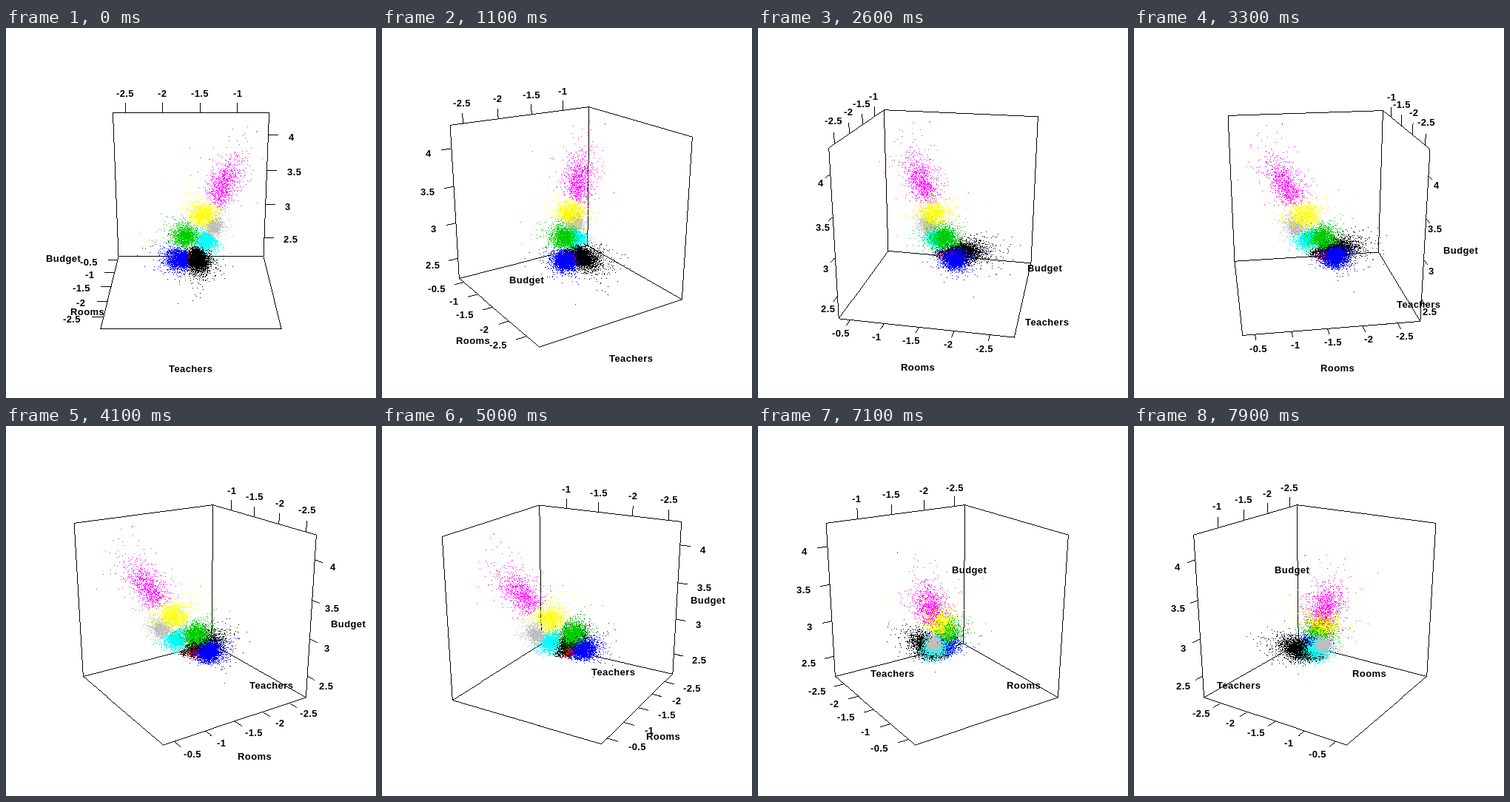
Animation, 500 px wide and 500 px high, one loop 8 s. Source, as an HTML page with a canvas:

```html
<!DOCTYPE html>
<html lang="en">
<head>
<meta charset="utf-8">
<title>Rotating scatter plot</title>
<style>
  html, body { margin: 0; width: 100%; height: 100%; overflow: hidden; background: #fff; }
  canvas { display: block; }
</style>
</head>
<body>
<canvas id="stage" width="500" height="500"></canvas>
<script>
const SIZE = 500, STEP = 100, LOOP = 8000;
const FOCAL = 933, DIST = 8.24;
const TILT = Math.PI / 9, TS = Math.sin(TILT), TC = Math.cos(TILT);

const ctx = document.getElementById('stage').getContext('2d');
const image = ctx.createImageData(SIZE, SIZE);
const pixels = new Uint32Array(image.data.buffer);
const depths = new Float32Array(SIZE * SIZE);
const rgb = (r, g, b) => (0xff000000 | b << 16 | g << 8 | r) >>> 0;
const BLACK = rgb(0, 0, 0), WHITE = rgb(255, 255, 255);

// Seeded random numbers
let seed = 20771;
function rand() {
  seed = (seed + 0x6d2b79f5) | 0;
  let t = Math.imul(seed ^ seed >>> 15, 1 | seed);
  t = (t + Math.imul(t ^ t >>> 7, 61 | t)) ^ t;
  return ((t ^ t >>> 14) >>> 0) / 4294967296;
}
const gauss = () => Math.sqrt(-2 * Math.log(1 - rand())) * Math.cos(2 * Math.PI * rand());

// Point groups: colour, count, centre, spread, stretch along one direction
const groups = [
  { color: BLACK, n: 3200, mid: [.07, -.52, .2], sd: [.075, .07, .12], along: [.02, .02, .08] },
  { color: rgb(255, 0, 0), n: 350, mid: [0, -.56, .08], sd: [.035, .03, .06], along: [0, 0, 0], free: true },
  { color: rgb(0, 205, 0), n: 1700, mid: [-.06, -.29, .03], sd: [.085, .08, .09], along: [-.02, .02, .02] },
  { color: rgb(0, 0, 255), n: 2600, mid: [-.13, -.53, .17], sd: [.075, .07, .08], along: [-.03, .02, .02] },
  { color: rgb(0, 255, 255), n: 1700, mid: [.18, -.4, -.1], sd: [.075, .07, .08], along: [.03, 0, 0] },
  { color: rgb(255, 0, 255), n: 900, mid: [.38, .2, -.33], sd: [.1, .1, .1], along: [.08, .16, -.08] },
  { color: rgb(255, 255, 0), n: 1200, mid: [.15, -.08, -.15], sd: [.1, .08, .1], along: [.02, .02, -.02] },
  { color: rgb(190, 190, 190), n: 1100, mid: [.28, -.28, -.25], sd: [.055, .05, .06], along: [.03, .04, -.02] }
];

function gap(p, g) {
  const [dx, dy, dz] = p.map((v, i) => v - g.mid[i]);
  return dx * dx + dy * dy + .3 * dz * dz;
}

function fits(p, g) {
  if (p.some(v => Math.abs(v) > 1) || p[1] < -.62 - .36 * p[2]) return false;
  const own = gap(p, g);
  return g.free || groups.every(o => o.free || o === g || gap(p, o) >= own);
}

const points = [];
for (const g of groups) {
  for (let left = g.n; left > 0;) {
    const tail = .6 - .42 * Math.log(1 - rand()), pull = gauss();
    const p = g.mid.map((m, i) => m + tail * (gauss() * g.sd[i] + pull * g.along[i]));
    if (!fits(p, g)) continue;
    points.push([...p, g.color]);
    left--;
  }
}
points.push([.79, .92, -.34, rgb(255, 0, 255)], [-.15, -1, .41, rgb(0, 0, 255)]);

// Axes: each lists the box edges it may sit on and the way its ticks point
const X_UP = [0, 1, 0], X_DOWN = [0, -1, 0], RIGHT = [1, 0, 0], LEFT = [-1, 0, 0];
const axes = [
  { slot: 0, title: 'Teachers', titleAt: [0, -1.3, 1.3], ticks: [-2.5, -2, -1.5, -1],
    place: v => .948 * v + 1.536,
    edges: [[[0, 1, -1], X_UP], [[0, 1, 1], X_UP], [[0, -1, -1], X_DOWN], [[0, -1, 1], X_DOWN]] },
  { slot: 1, title: 'Budget', titleAt: [-1.3, 0, 1.3], ticks: [2.5, 3, 3.5, 4],
    place: v => .956 * v - 3.109,
    edges: [[[1, 0, -1], RIGHT], [[1, 0, 1], RIGHT], [[-1, 0, -1], LEFT], [[-1, 0, 1], LEFT]] },
  { slot: 2, title: 'Rooms', titleAt: [-1.3, -1.3, 0], ticks: [-2.5, -2, -1.5, -1, -.5],
    place: v => -.8 * v - 1.264,
    edges: [[[-1, -1, 0], LEFT], [[1, -1, 0], RIGHT], [[-1, 1, 0], X_UP], [[1, 1, 0], X_UP]] }
];

let sin = 0, cos = 1;

// Depth toward the viewer after turning and tilting
const toward = ([x, y, z]) => y * TS + (z * cos - x * sin) * TC;

function project(p) {
  const [x, y, z] = p;
  const dist = DIST - toward(p), k = FOCAL / dist;
  return [250 + k * (x * cos + z * sin), 250 - k * (y * TC - (z * cos - x * sin) * TS), dist];
}

function faceNormal(slot, sign) {
  const n = [0, 0, 0];
  n[slot] = sign;
  return n;
}
const isBack = (slot, sign) => toward(faceNormal(slot, sign)) < 0;

function line(a, b) {
  const [x0, y0] = project(a), [x1, y1] = project(b);
  const n = Math.max(1, Math.ceil(Math.max(Math.abs(x1 - x0), Math.abs(y1 - y0))));
  for (let i = 0; i <= n; i++) {
    const x = Math.floor(x0 + (x1 - x0) * i / n), y = Math.floor(y0 + (y1 - y0) * i / n);
    pixels[y * SIZE + x] = BLACK;
  }
}

// Outline of every box face that looks away from the viewer
function drawBox() {
  for (let slot = 0; slot < 3; slot++) {
    for (const sign of [-1, 1]) {
      if (!isBack(slot, sign)) continue;
      const corners = [[-1, -1], [1, -1], [1, 1], [-1, 1]].map(([u, v]) => {
        const p = [sign, sign, sign];
        p[(slot + 1) % 3] = u;
        p[(slot + 2) % 3] = v;
        return p;
      });
      corners.forEach((p, i) => line(p, corners[(i + 1) % 4]));
    }
  }
}

function drawPoints() {
  depths.fill(1e9);
  for (const p of points) {
    const [x, y, d] = project(p);
    const i = Math.floor(y) * SIZE + Math.floor(x);
    if (d < depths[i]) {
      depths[i] = d;
      pixels[i] = p[3];
    }
  }
}

// The outline edge whose ticks point most toward the viewer
function pickEdge(axis) {
  let best = null;
  for (const edge of axis.edges) {
    const backs = edge[0].filter((s, i) => i !== axis.slot && isBack(i, s)).length;
    if (backs === 1 && (!best || toward(edge[1]) > toward(best[1]))) best = edge;
  }
  return best;
}

function drawTicks(axis, labels) {
  const [at, dir] = pickEdge(axis);
  for (const v of axis.ticks) {
    const base = at.slice();
    base[axis.slot] = axis.place(v);
    const out = k => base.map((c, i) => c + dir[i] * k);
    line(base, out(.125));
    const [x, y] = project(out(.25));
    labels.push({ text: String(v), x, y: y + (dir[1] > 0 ? 4.7 : 7.4), lean: dir[0] * cos });
  }
}

function draw(step) {
  const angle = step * 3 * Math.PI / 180;
  sin = Math.sin(angle);
  cos = Math.cos(angle);
  pixels.fill(WHITE);
  const labels = [];
  drawBox();
  for (const axis of axes) {
    drawTicks(axis, labels);
    const [x, y] = project(axis.titleAt);
    labels.push({ text: axis.title, x, y: y + 7, lean: 0 });
  }
  drawPoints();
  ctx.putImageData(image, 0, 0);

  ctx.font = 'bold 13px "Liberation Sans", Arial, sans-serif';
  ctx.letterSpacing = '0.4px';
  ctx.fillStyle = '#000';
  for (const { text, x, y, lean } of labels) {
    const half = ctx.measureText(text).width / 2;
    ctx.fillText(text, Math.round(x + lean * (half + 1.5) - half), Math.round(y));
  }
}

const start = performance.now();
let shown = -1;
function tick() {
  const step = Math.floor((performance.now() - start) % LOOP / STEP);
  if (step !== shown) draw(shown = step);
  requestAnimationFrame(tick);
}
tick();
</script>
</body>
</html>
```
